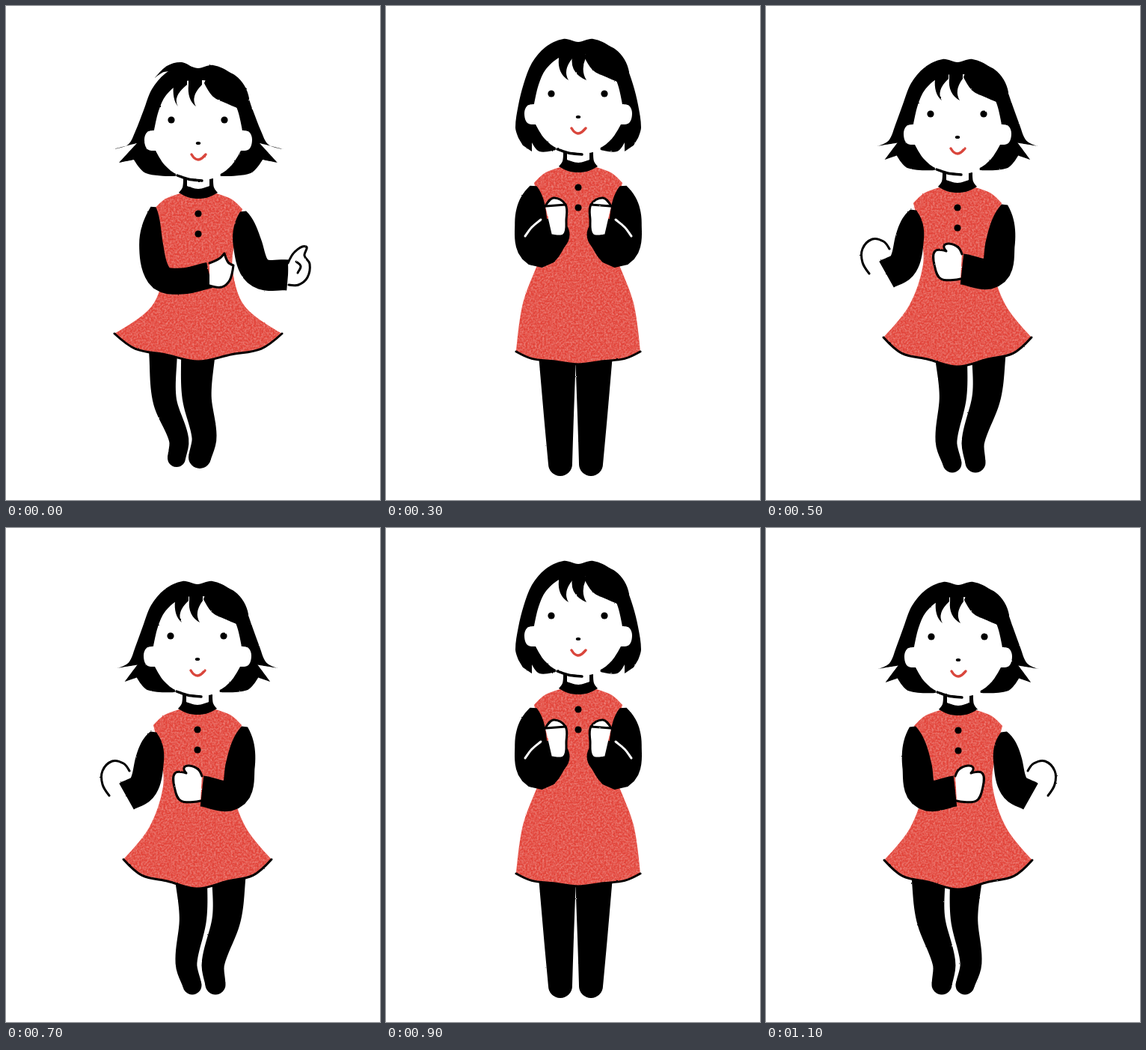
Recreate the animation shown at these times as an HTML page. Size 500 px wide and 659 px high, loop 1.2 s.

```html
<!DOCTYPE html>
<html lang="en">
<head>
<meta charset="utf-8">
<title>Dancing girl</title>
<style>
  html, body { margin: 0; width: 100%; height: 100%; overflow: hidden; background: #fff; }
  svg { display: block; width: 100vw; height: 100vh; }
  path { stroke-linecap: round; stroke-linejoin: round; }
</style>
</head>
<body>
<svg viewBox="0 0 500 659">
  <defs>
    <filter id="rough" filterUnits="userSpaceOnUse" x="0" y="0" width="500" height="659" color-interpolation-filters="sRGB">
      <feTurbulence type="fractalNoise" baseFrequency=".25" numOctaves="2" seed="4"/>
      <feDisplacementMap in="SourceGraphic" scale="1.6" xChannelSelector="R" yChannelSelector="G"/>
    </filter>
    <filter id="crayon" filterUnits="userSpaceOnUse" x="-250" y="-200" width="500" height="659" color-interpolation-filters="sRGB">
      <feTurbulence type="fractalNoise" baseFrequency=".4" numOctaves="3" seed="9"/>
      <feColorMatrix values="0 0 0 0 1  0 0 0 0 .9  0 0 0 0 .88  .75 0 0 0 -.25"/>
      <feComposite in2="SourceGraphic" operator="in" result="grain"/>
      <feMerge><feMergeNode in="SourceGraphic"/><feMergeNode in="grain"/></feMerge>
    </filter>
  </defs>
  <g id="girl"></g>
</svg>
<script>
const RED = '#e2443a', STEP = 100;

// Smooth curve through "x,y" points; a trailing "!" marks a sharp corner.
function curve(text, closed) {
  const pts = text.split(' ').map(t => {
    const [x, y] = t.split(',').map(parseFloat);
    return { x, y, sharp: t.endsWith('!') };
  });
  const n = pts.length;
  const at = i => closed ? pts[(i + n) % n] : pts[Math.min(n - 1, Math.max(0, i))];
  const handle = (i, reach) => {
    const p = at(i), a = at(i - 1), b = at(i + 1);
    const k = p.sharp ? 0 : reach / (Math.hypot(b.x - a.x, b.y - a.y) || 1);
    return `${(p.x + (b.x - a.x) * k).toFixed(1)} ${(p.y + (b.y - a.y) * k).toFixed(1)}`;
  };
  let d = `M${pts[0].x} ${pts[0].y}`;
  for (let i = 0; i < (closed ? n : n - 1); i++) {
    const p = at(i), q = at(i + 1), reach = Math.hypot(q.x - p.x, q.y - p.y) / 3;
    d += `C${handle(i, reach)} ${handle(i + 1, -reach)} ${q.x} ${q.y}`;
  }
  return closed ? d + 'Z' : d;
}

const shape = (pts, color = '#000') => `<path d="${curve(pts, true)}" fill="${color}"/>`;
const line = (pts, width = 3, color = '#000', inside = 'none') =>
  `<path d="${curve(pts)}" fill="${inside}" stroke="${color}" stroke-width="${width}"/>`;
const hand = pts => line(pts, 3, '#000', '#fff');
const dot = (x, y, rx = 4.6, ry = rx) => `<ellipse cx="${x}" cy="${y}" rx="${rx}" ry="${ry}"/>`;
const move = (art, x, y) => `<g transform="translate(${x} ${y})">${art}</g>`;
const mirror = (art, sum) => `<g transform="matrix(-1 0 0 1 ${sum} 0)">${art}</g>`;

// Adds the left half to the right half of an outline around x = 0.
function both(half) {
  const right = half.split(' ');
  const left = right.filter(p => !p.startsWith('0,')).reverse().map(p => '-' + p);
  return [...right, ...left].join(' ');
}

// A band along a curve; width(t) gives its thickness from start to end.
function limb(pts, width, round) {
  const spine = document.createElementNS('http://www.w3.org/2000/svg', 'path');
  spine.setAttribute('d', curve(pts));
  const length = spine.getTotalLength(), count = 30, sides = [[], []];
  for (let i = 0; i <= count; i++) {
    const t = i / count, p = spine.getPointAtLength(t * length);
    const a = spine.getPointAtLength(t * length - 1), b = spine.getPointAtLength(t * length + 1);
    const k = width(t) / 2 / Math.hypot(b.x - a.x, b.y - a.y);
    const dx = (a.y - b.y) * k, dy = (b.x - a.x) * k;
    sides[0].push(`${p.x + dx},${p.y + dy}`);
    sides[1].unshift(`${p.x - dx},${p.y - dy}`);
  }
  const end = spine.getPointAtLength(length);
  return `<path d="M${sides.flat().join('L')}Z"/>` + (round ? dot(end.x, end.y, width(1) / 2) : '');
}

const leg = (pts, top, foot) => limb(pts, t => top + (foot - top) * t, true);
const arm = (pts, width, round) => limb(pts, t => width * (1 - .8 * (1 - t) ** 6), round);

// Head and dress are laid out around the nose.
function head(flare, sway) {
  const f = flare;
  const hair = both(`0,-100 20,-104 44,-93 62,-72 73,-44 ${80 + 4 * f},-16 ${84 + 10 * f},${14 - 12 * f} `
    + `${80 + 34 * f},${28 - 20 * f}! ${74 + 8 * f},${38 - 38 * f}! ${62 + 44 * f},${46 - 20 * f}! `
    + `${62 + 24 * f},${34 - 12 * f}! ${52 + 18 * f},${46 - 6 * f} 30,44! 0,-30`);
  const face = both('0,-84 22,-81 43,-64 53,-43 59,-17! 68,-15 72,-5 68,8 57,10! 45,29 28,42 0,49');
  const lock = (root, tip) =>
    `<path d="M${root} -86V-78Q${root - 2} -58 ${tip} -49Q${tip - 8} -62 ${root + 18} -78V-86Z"/>`;
  const wisp = flare === 1 ? shape('-8,-101! -22,-108 -42,-103 -58,-87! -46,-95 -30,-96') : '';
  return shape(hair) + wisp + shape(face, '#fff')
    + lock(-30 + sway / 2, -21 + sway) + lock(-11 + sway / 3, 3 + sway)
    + shape('8,-80! 20,-62 38,-53 57,-45! 68,-60 50,-90 20,-96')
    + dot(-36, -31) + dot(35, -31) + dot(0, 0, 3.2, 2)
    + line('-9,15 -5,20 0,22 5,20 10,15', 3.4, '#d9463c') + line('-28,43 -13,48 5,50', 3.4);
}

function dress(flare, [width, drop, sag]) {
  const middle = `${46 + (width - 46) * (.75 - .5 * flare)},${182 + (drop - 182) / 2}`;
  const hem = `${width},${drop}! ${width * .75},${drop + sag * .55} ${width * .4},${drop + sag * .75} 0,${drop + sag}`;
  return `<g filter="url(#crayon)">${shape(both(`0,74 24,67! 45,75 59,88! 49,130 46,170 ${middle} ${hem}`), RED)}</g>`
    + line(both(hem))
    + shape(both('0,61 15,57! 15,48! 20,47! 21,59 26,66! 14,72 0,74'))
    + dot(0, 94) + dot(0, 121);
}

const figure = ({ nose, flare, sway, skirt, legs, arms, flip }) => {
  const side = art => flip ? mirror(art, flip) : art;
  return side(legs) + move(dress(flare, skirt), ...nose) + side(arms) + move(head(flare, sway), ...nose);
};

const wide = {
  nose: [257, 183], flare: 1, sway: -6, skirt: [112, 254, 37],
  legs: leg('210,460 212,525 231,578 228,603', 38, 24) + leg('257,460 255,520 265,575 259,602', 46, 30),
  arms: arm('197,268 194,318 206,361 235,367 272,359', 35) + arm('317,274 323,318 338,355 377,359', 41)
    + hand('272,343! 285,337 292,330! 297,342 304,346! 299,366 288,375 272,373!')
    + hand('377,343! 386,328 401,321 399,333 406,344 403,362 391,372 378,372!')
    + line('388,341 394,347 390,356')
};

const swing = {
  nose: [257, 176], flare: .8, sway: 0, skirt: [99, 267, 39],
  legs: leg('217,460 220,520 238,580 235,609', 46, 27) + leg('268,460 265,520 274,580 266,610', 44, 25),
  arms: arm('196,265 202,318 212,355 253,351', 41) + arm('318,272 323,310 332,345 354,358', 40)
    + hand('253,331! 258,322 270,317 277,320 274,327! 289,327 290,345 281,364 255,364!')
    + hand('350,324! 358,314 373,311 386,324 386,342 377,357!')
};

const rise = {
  nose: [257, 157], flare: .25, sway: 18, skirt: [88, 298, 14],
  legs: leg('222,455 225,520 231,597', 42, 30) + leg('268,455 270,530 268,599', 46, 31),
  arms: arm('195,250 194,295 204,328 236,306', 43) + arm('318,251 320,295 326,334', 47, true)
    + line('194,308 207,295 227,286', 3, RED)
    + hand('228,289! 242,277 254,288 257,300 254,320 243,331 230,322!')
    + hand('314,292! 314,281 330,278 346,275 350,290 345,314 322,315!')
};

const topArm = arm('197,240 194,290 203,326 223,305', 45, true)
  + line('186,307 195,295 207,285', 3, '#fff')
  + hand('213,267! 224,256 240,265 241,285 238,305 222,306!') + line('214,267 240,265');
const topLeg = leg('229,465 231,545 233,611', 50, 32);
const top_ = {
  nose: [257, 148], flare: 0, sway: 8, skirt: [83, 313, 17],
  legs: topLeg + mirror(topLeg, 507), arms: topArm + mirror(topArm, 514)
};

const poses = [
  wide, swing, rise, top_,
  { ...rise, nose: [256, 159], flip: 513 },
  { ...swing, nose: [256, 175], flip: 515 },
  { ...wide, nose: [257, 183], flip: 517 }
];

const girl = document.getElementById('girl');
girl.innerHTML = poses.map(p => `<g filter="url(#rough)" display="none">${figure(p)}</g>`).join('');
const layers = [...girl.children];
let start = null, shown = -1;

// The dance runs through the poses and back again.
function draw(time) {
  const last = poses.length - 1;
  const beat = Math.floor(time / STEP) % (2 * last);
  const pose = last - Math.abs(last - beat);
  if (pose === shown) return;
  layers.forEach((layer, i) => layer.setAttribute('display', i === pose ? 'inline' : 'none'));
  shown = pose;
}

function tick(now) {
  start ??= now;
  draw(now - start);
  requestAnimationFrame(tick);
}

draw(0);
requestAnimationFrame(tick);
</script>
</body>
</html>
```
